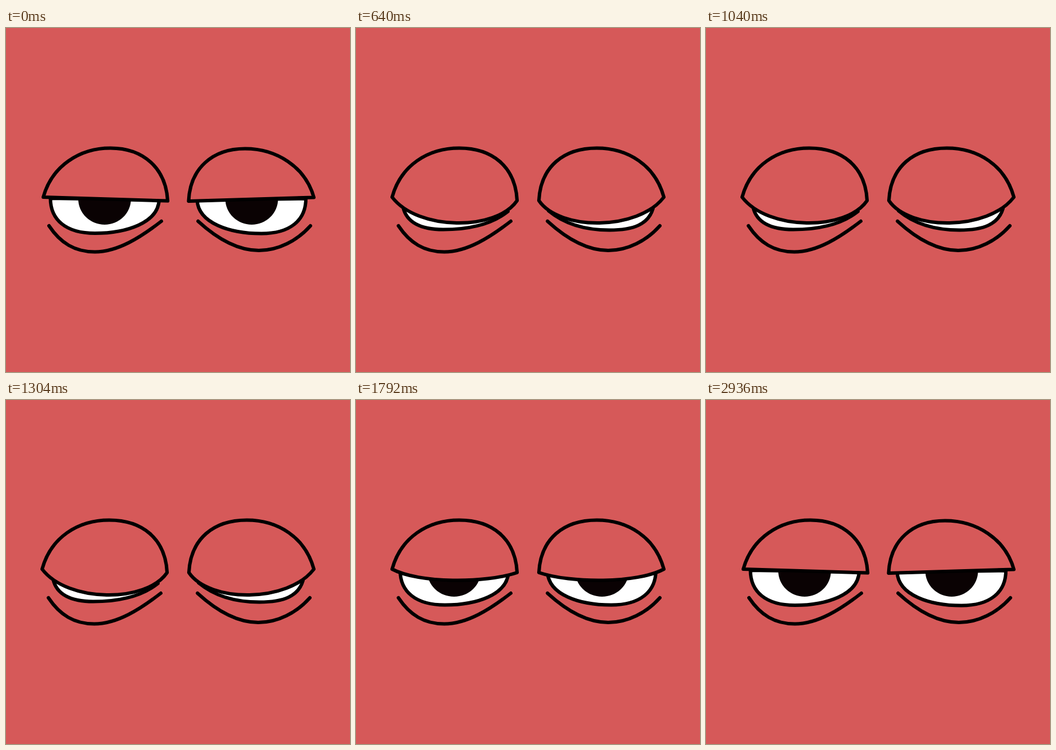
Recreate the animation shown at these times as an HTML page. Size 600 px wide and 600 px high, loop 3.56 s.

```html
<!DOCTYPE html>
<html lang="en">
<head>
<meta charset="utf-8">
<title>Tired blink</title>
<style>
  html, body { margin: 0; height: 100%; overflow: hidden; background: #d65959; }
  svg { display: block; width: 100vw; height: 100vh; }
  path { fill: none; stroke: #000; stroke-width: 6; stroke-linecap: round; stroke-linejoin: round; }
  .white { fill: #fff; }
  .lid { fill: #d65959; }
  ellipse { fill: #0a0203; }

  .pose { visibility: hidden; animation: 3560ms step-end infinite; }
  #open { animation-name: open; }
  #half { animation-name: half; }
  #closed { animation-name: closed; }

  @keyframes open {
    0%, 56.179% { visibility: visible; }
    7.865% { visibility: hidden; }
    100% { visibility: visible; }
  }
  @keyframes half {
    0%, 17.977%, 29.213%, 56.179%, 100% { visibility: hidden; }
    7.865%, 21.348%, 41.573% { visibility: visible; }
  }
  @keyframes closed {
    0%, 21.348%, 41.573%, 100% { visibility: hidden; }
    17.977%, 29.213% { visibility: visible; }
  }
</style>
</head>
<body>
<svg viewBox="0 0 600 600">
  <defs>
    <g id="eyeball">
      <path class="white" d="M77.5 297C77.5 335 105 358 155 358C210 358 265 340 267 300Z"/>
    </g>
    <g id="half-eye">
      <path class="white" d="M77 297C77 335 105 357.5 155 357.5C210 357.5 264 340 266 300Z"/>
      <ellipse cx="171" cy="297.5" rx="47" ry="45.5"/>
      <path class="lid" d="M63 295C78 240 125 209.5 180 209.5C238 209.5 278 242 281 301C225 320 110 320 63 295Z"/>
    </g>
    <path id="closed-lid" class="lid" d="M63 295C78 240 125 209.5 180 209.5C238 209.5 278 242 281 301C245 354 108 354 63 295Z"/>
    <g id="bags">
      <path d="M75 345C95 375 120 390.5 155 390.5C195 390.5 235 365 271 337"/>
      <path d="M335 337C371 370 405 388 441 388C475 388 508 371 531 345"/>
    </g>
  </defs>

  <g id="open" class="pose">
    <use href="#eyeball"/>
    <use href="#eyeball" transform="translate(600.5 .5) scale(-1 1)"/>
    <ellipse cx="172" cy="298" rx="46" ry="45"/>
    <ellipse cx="428.5" cy="298" rx="46" ry="45"/>
    <path class="lid" d="M65 295C80 241 128 209.5 182 209.5C240 209.5 279 245 282 301.5Z"/>
    <path class="lid" d="M537 295.5C522 242 472 210.5 417 210.5C360 210.5 321 245 318.5 302Z"/>
    <use href="#bags"/>
  </g>

  <g id="half" class="pose">
    <use href="#half-eye"/>
    <use href="#half-eye" transform="translate(600 0) scale(-1 1)"/>
    <use href="#bags" x="-1"/>
  </g>

  <g id="closed" class="pose">
    <path class="white" d="M82 312C88 340 115 351.5 152 351.5C195 351.5 235 344 265 320Z"/>
    <path class="white" d="M518 315C510 342 485 352.5 442 352.5C400 352.5 365 343 336 319Z"/>
    <use href="#closed-lid"/>
    <use href="#closed-lid" transform="translate(600 0) scale(-1 1)"/>
    <use href="#bags" x="-1"/>
  </g>
</svg>
</body>
</html>
```
